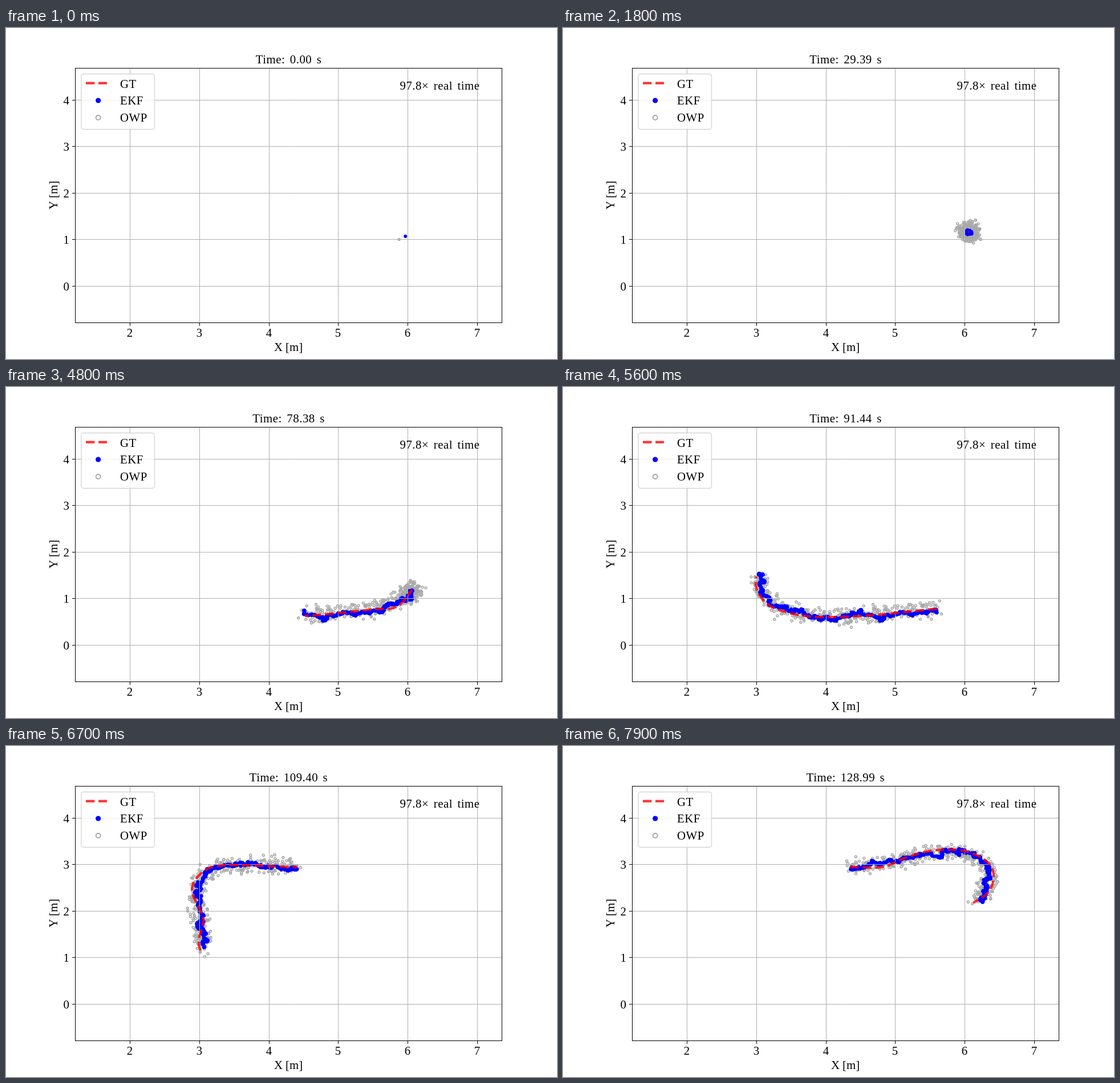
An HTML page with a canvas for the animation above (8 s loop, 966 by 580 pixels).

```html
<!DOCTYPE html>
<html lang="en">
<head>
<meta charset="utf-8">
<title>Position tracking</title>
<style>
html, body { margin: 0; width: 100%; height: 100%; overflow: hidden; background: #fff; }
canvas { display: block; }
</style>
</head>
<body>
<canvas id="stage" width="966" height="580"></canvas>
<script>
const c = document.getElementById('stage').getContext('2d');
const X0 = -25.8, Y0 = 452.45, SX = 121.7, SY = 81.6;   // axis origin and pixels per metre
const LEFT = 121, RIGHT = 870, TOP = 70, BOTTOM = 517;
const FRAMES = 80, FRAME_MS = 100, SEC_PER_FRAME = 1.63283;
const DT = 0.025, WINDOW = 20, START = 67.2, END = 129;
const COUNT = Math.ceil(END / DT) + 1;
const RED = 'rgba(255,0,0,.8)', BLUE = '#00f', GREY = '#a9a9a9', GRID = '#b0b0b0';
const DASH = [15.4, 6.7];

// Key points of the walk, joined by a smooth curve
const route = [
  [712, 356], [685, 385], [640, 390], [526, 401], [432, 402], [370, 387], [345, 365], [338, 340],
  [346, 302], [326, 253], [345, 221], [385, 209], [504, 212], [560, 212], [600, 196], [650, 183],
  [705, 184], [745, 204], [755, 230], [745, 257], [719, 275]];

let seed = 7;
const random = () => (seed = (seed * 1664525 + 1013904223) % 4294967296) / 4294967296;
const normal = () => (random() + random() + random() + random() - 2) * 1.73;
const clamp = (v, max) => Math.max(0, Math.min(max, v));

function spline(a, b, d, e, s) {
  return (2 * b + (d - a) * s + (2 * a - 5 * b + 4 * d - e) * s * s + (3 * b - a - 3 * d + e) * s ** 3) / 2;
}

// Fine points along the route with the metres walked so far
const STEPS = 100;
const path = [];
const key = i => route[clamp(i, route.length - 1)];
for (let i = 0; i <= (route.length - 1) * STEPS; i++) {
  const k = Math.floor(i / STEPS), s = i / STEPS - k;
  const [x, y] = [0, 1].map(j => spline(key(k - 1)[j], key(k)[j], key(k + 1)[j], key(k + 2)[j], s));
  const p = path[i - 1];
  path.push({ x, y, walked: p ? p.walked + Math.hypot((x - p.x) / SX, (y - p.y) / SY) : 0 });
}

// True position: standing until START, then walking at constant speed
const total = path[path.length - 1].walked;
const truth = [];
for (let i = 0, n = 0; i < COUNT; i++) {
  const t = i * DT;
  const walked = total * clamp((t - START) / (END - START), 1);
  while (n < path.length - 1 && path[n].walked < walked) n++;
  truth.push(t < START ? [711 + 0.8 * Math.sin(t / 3), 357.5] : [path[n].x, path[n].y]);
}

// The filter cuts corners and drifts; raw positions scatter around it
const CUT = 1.8 / DT;
const filter = [], raw = [];
let driftX = 0, driftY = 0;
for (let i = 0; i < COUNT; i++) {
  const t = i * DT;
  const a = truth[clamp(i - CUT, COUNT - 1)], b = truth[clamp(i + CUT, COUNT - 1)];
  const settle = Math.exp(-t / 1.2);
  const x = (a[0] + b[0]) / 2 - 11 * settle;
  const y = (a[1] + b[1]) / 2 + 7.5 * settle;
  const amp = t > START ? 4 : 0.4 + 3 * Math.exp(-t / 18);
  filter.push([x + driftX * amp, y + driftY * amp]);
  if (i % 2 === 0) raw.push([x + normal() * 8.5, y + normal() * 7.5]);
  driftX = 0.97 * driftX + 0.24 * normal();
  driftY = 0.97 * driftY + 0.24 * normal();
}
raw[0] = [689, 370.5];

function line(x1, y1, x2, y2) {
  c.beginPath();
  c.moveTo(x1, y1);
  c.lineTo(x2, y2);
  c.stroke();
}

function pen(color, width, dash = []) {
  c.strokeStyle = color;
  c.lineWidth = width;
  c.setLineDash(dash);
}

function disc([x, y], r) {
  c.beginPath();
  c.arc(x, y, r, 0, 7);
}

function text(s, x, y, align = 'center') {
  c.textAlign = align;
  c.fillStyle = '#000';
  c.fillText(s, x, y);
}

function eachX(fn) {
  for (let v = 2; v <= 7; v++) fn(Math.floor(X0 + v * SX) + 0.5, v);
}

function eachY(fn) {
  for (let v = 0; v <= 4; v++) fn(Math.floor(Y0 - v * SY) + 0.5, v);
}

function drawTracks(now) {
  const end = Math.min(COUNT - 1, Math.floor(now / DT));
  const begin = Math.max(0, Math.ceil((now - WINDOW) / DT));
  pen(GREY, 1.6);
  for (let i = Math.ceil(begin / 2); i <= end / 2; i++) { disc(raw[i], 1.9); c.stroke(); }
  c.fillStyle = BLUE;
  for (let i = begin; i <= end; i++) { disc(filter[i], 3); c.fill(); }
  pen(GRID, 1);
  eachX(x => line(x, TOP, x, BOTTOM));
  eachY(y => line(LEFT, y, RIGHT, y));
  pen(RED, 4.17, DASH);
  c.beginPath();
  for (let i = begin; i <= end; i++) c.lineTo(...truth[i]);
  c.stroke();
}

function drawAxes(now) {
  pen('#000', 1);
  c.strokeRect(LEFT + 0.5, TOP + 0.5, RIGHT - LEFT - 1, BOTTOM - TOP - 1);
  eachX((x, v) => {
    line(x, BOTTOM, x, BOTTOM + 5);
    text(v, x - 0.5, 541);
  });
  eachY((y, v) => {
    line(LEFT - 5, y, LEFT, y);
    text(v, 111, y + 7, 'right');
  });
  text('X [m]', 495, 566);
  c.save();
  c.translate(90, 293);
  c.rotate(-Math.PI / 2);
  text('Y [m]', 0, 0);
  c.restore();
  c.letterSpacing = '.55px';
  c.wordSpacing = '2.6px';
  text(`Time: ${now.toFixed(2)} s`, 495.5, 62);
  text('97.8× real time', 760.5, 108);
}

function drawLegend() {
  c.beginPath();
  c.roundRect(132, 80.5, 128.5, 97, 4);
  c.fillStyle = 'rgba(255,255,255,.8)';
  c.fill();
  pen('rgba(204,204,204,.8)', 1.4);
  c.stroke();
  pen(RED, 4.17, DASH);
  line(140, 96.6, 177, 96.6);
  c.fillStyle = BLUE;
  disc([161.7, 127], 4.6);
  c.fill();
  pen(GREY, 2);
  disc([161.7, 157], 4);
  c.stroke();
  ['GT', 'EKF', 'OWP'].forEach((s, i) => text(s, 200, 104.5 + i * 29.5, 'left'));
}

function draw(ms) {
  const now = Math.floor(ms / FRAME_MS) % FRAMES * SEC_PER_FRAME;
  c.fillStyle = '#fff';
  c.fillRect(0, 0, 966, 580);
  c.font = '20.8px "Liberation Serif", serif';
  c.letterSpacing = c.wordSpacing = '0px';
  drawTracks(now);
  drawAxes(now);
  drawLegend();
}

let origin;
function tick(ms) {
  origin ??= ms;
  draw(ms - origin);
  requestAnimationFrame(tick);
}
requestAnimationFrame(tick);
</script>
</body>
</html>
```
